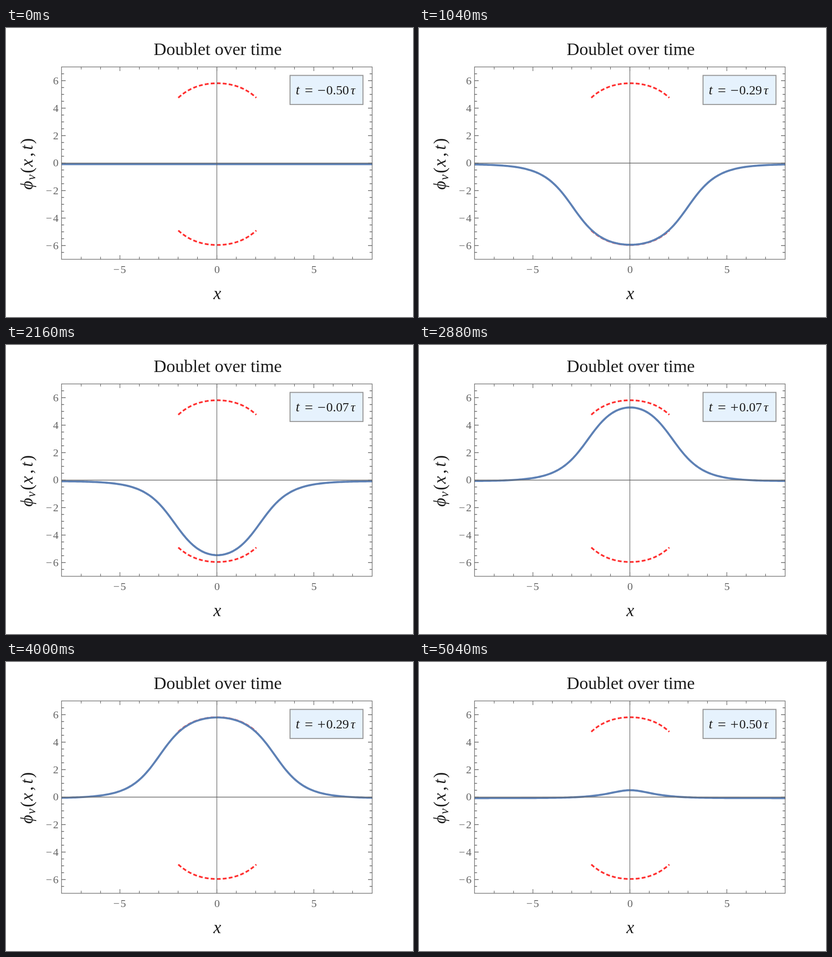
An HTML page that plays this animation: 887 by 631 pixels, repeating every 5120 ms.

```html
<!DOCTYPE html>
<html lang="en">
<head>
<meta charset="utf-8">
<title>Doublet over time</title>
<style>
  html, body { margin: 0; width: 100%; height: 100%; overflow: hidden; background: #fff; }
  svg { display: block; font-family: "Liberation Serif", "DejaVu Serif", serif; fill: #1c1c1c; }
  path, .frame { fill: none; }
  .frame, .ticks, .axes { stroke: #666; stroke-width: 1.3; }
  .labels { fill: #666; font-size: 24px; }
  .limit { stroke: #ff3030; stroke-width: 3.7; stroke-dasharray: 8.4 4.7; }
  .wave { stroke: #5e81b5; stroke-width: 4.4; stroke-linejoin: round; }
  .box { fill: #e6f2fd; stroke: #999; stroke-width: 2.2; }
  .clock { font-size: 28.3px; }
  .op { font-size: 32px; text-anchor: middle; }
  .it { font-style: italic; }
</style>
</head>
<body>
<svg width="887" height="631" viewBox="0 0 887 631">
  <clipPath id="plot"><rect x="121" y="85" width="677.5" height="420"/></clipPath>
  <text x="461.5" y="59" font-size="38.4" text-anchor="middle">Doublet over time</text>
  <text class="it" x="460.5" y="592" font-size="38" text-anchor="middle">x</text>
  <g transform="translate(58 353) rotate(-90)" font-size="37">
    <text class="it" x="0">ϕ</text>
    <text class="it" x="21" y="6" font-size="27">v</text>
    <text x="36">(</text>
    <text class="it" x="50" font-size="38">x</text>
    <text x="72">,</text>
    <text class="it" x="87">t</text>
    <text x="100">)</text>
  </g>
  <g clip-path="url(#plot)">
    <path class="limit" id="upper"/>
    <path class="limit" id="lower"/>
    <path class="wave" id="wave"/>
  </g>
  <path class="axes" d="M121 295H798M459.5 85V505"/>
  <rect class="frame" x="121" y="85" width="677" height="420"/>
  <path class="ticks" id="ticks"/>
  <g class="labels" id="labels"></g>
  <rect class="box" x="619" y="103.5" width="159" height="63.5"/>
  <g class="clock">
    <text class="it" x="631.5" y="145" font-size="30">t</text>
    <text class="op" x="660" y="146.5">=</text>
    <text class="op" x="687.5" y="146.5" id="sign"></text>
    <text x="698" y="145" id="value"></text>
    <text class="it" x="751" y="145">τ</text>
  </g>
</svg>
<script>
const $ = id => document.getElementById(id);

const LOOP = 5120, STEP = 80;
const SPAN = 0.9977;          // part of the period covered by one loop
const V = 0.1, GAMMA = 1 / Math.sqrt(1 - V * V);

const px = x => 459.6 + 42.25 * x;
const py = y => 295 - 30 * y;

// The curves sit slightly right of and below the axes
const curveX = x => 460.5 + 42.5 * x;
const curveY = y => 297.2 - 30 * y;

// Sine-Gordon breather, t in periods
const phi = (x, t) =>
  4 * Math.atan(Math.sin(2 * Math.PI * t) / (V * Math.cosh(GAMMA * x)));

function curve(t, reach) {
  const n = 160, points = [];
  for (let i = 0; i <= n; i++) {
    const x = reach * (2 * i / n - 1);
    points.push(curveX(x).toFixed(2) + " " + curveY(phi(x, t)).toFixed(2));
  }
  return "M" + points.join("L");
}

function label(text, x, y, anchor) {
  const el = document.createElementNS("http://www.w3.org/2000/svg", "text");
  el.setAttribute("x", x);
  el.setAttribute("y", y);
  el.setAttribute("text-anchor", anchor);
  el.textContent = String(text).replace("-", "−\u200a");
  $("labels").append(el);
}

function drawScales() {
  let d = "";
  for (let x = -7; x <= 7; x++) {
    const major = x % 5 === 0, len = major ? 9 : 5.5;
    d += `M${px(x)} 505v${-len}M${px(x)} 85v${len}`;
    if (major) label(x, px(x) + (x < 0 ? -0.5 : 0.5), 534.5, "middle");
  }
  for (let y = -6.5; y <= 6.5; y += 0.5) {
    const major = y % 2 === 0, len = major ? 9 : 5.5;
    d += `M121 ${py(y)}h${len}M798 ${py(y)}h${-len}`;
    if (major) label(y, 114.5, py(y) + (y ? 8 : 6.5), "end");
  }
  $("ticks").setAttribute("d", d);
}

let shown = -1;
function render() {
  const step = Math.floor(performance.now() % LOOP / STEP);
  if (step !== shown) {
    shown = step;
    const t = -0.5 + SPAN * step / (LOOP / STEP - 1);
    $("wave").setAttribute("d", curve(t, 8.1));
    $("sign").textContent = t < 0 ? "−" : "+";
    $("value").textContent = Math.abs(t).toFixed(2);
  }
  requestAnimationFrame(render);
}

drawScales();
$("upper").setAttribute("d", curve(0.25, 2));
$("lower").setAttribute("d", curve(-0.25, 2));
render();
</script>
</body>
</html>
```
